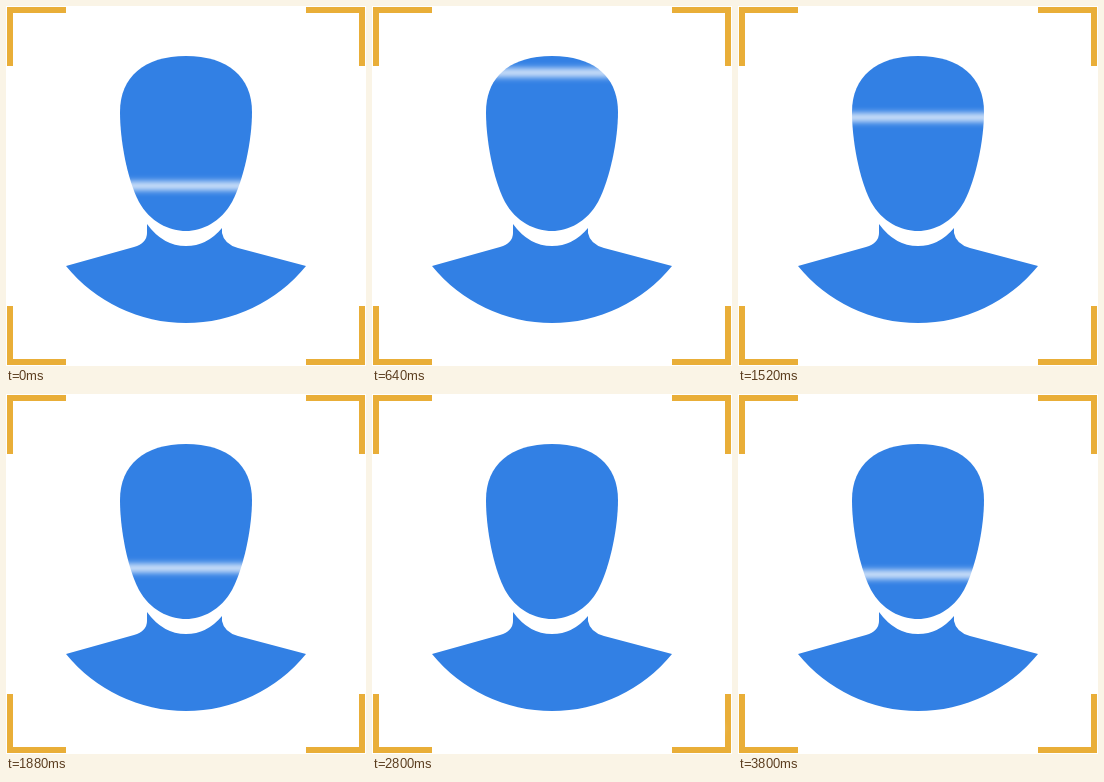
Animation, 360 px wide and 360 px high, one loop 3840 ms. Source, as an HTML page:

```html
<!DOCTYPE html>
<html lang="en">
<head>
<meta charset="utf-8">
<title>Face scan</title>
<style>
  html, body { margin: 0; height: 100%; overflow: hidden; background: #fff; }
  svg { display: block; width: 100vw; height: 100vh; }
</style>
</head>
<body>
<svg viewBox="0 0 360 360">
  <defs>
    <filter id="glow" filterUnits="userSpaceOnUse" x="0" y="-20" width="360" height="40">
      <feGaussianBlur stdDeviation="3.6"/>
    </filter>
  </defs>
  <g fill="#3280e4">
    <path d="M180 50C222 50 246 71 246 106C246 134 238 173 226 196C215 216 196 225 180 225C163 225 144 216 133 196C121 173 114 134 114 106C114 71 138 50 180 50Z"/>
    <path d="M60 260L128 241Q141 237 141 227V218Q157 240 180 240Q201 240 216 222V227Q218 238 232 242L300 260A154.8 154.8 0 0 1 60 260Z"/>
  </g>
  <path fill="none" stroke="#e9ae38" stroke-width="6"
    d="M4 60V4H60M300 4H356V60M356 300V356H300M60 356H4V300"/>
  <g id="beam"><rect x="14" y="-3.5" width="335" height="7" fill="#fff" filter="url(#glow)"/></g>
</svg>
<script>
  const LOOP = 3840;
  // [time in ms, beam centre], joined by straight runs
  const stops = [[0, 180], [950, 12], [2880, 348], [3800, 180.5], [LOOP, 180]];
  const beam = document.getElementById('beam');

  function beamY(t) {
    const i = stops.findIndex(([end]) => t < end);
    const [t0, y0] = stops[i - 1], [t1, y1] = stops[i];
    return y0 + (y1 - y0) * (t - t0) / (t1 - t0);
  }

  function draw() {
    beam.setAttribute('transform', `translate(0 ${beamY(performance.now() % LOOP)})`);
    requestAnimationFrame(draw);
  }
  draw();
</script>
</body>
</html>
```
